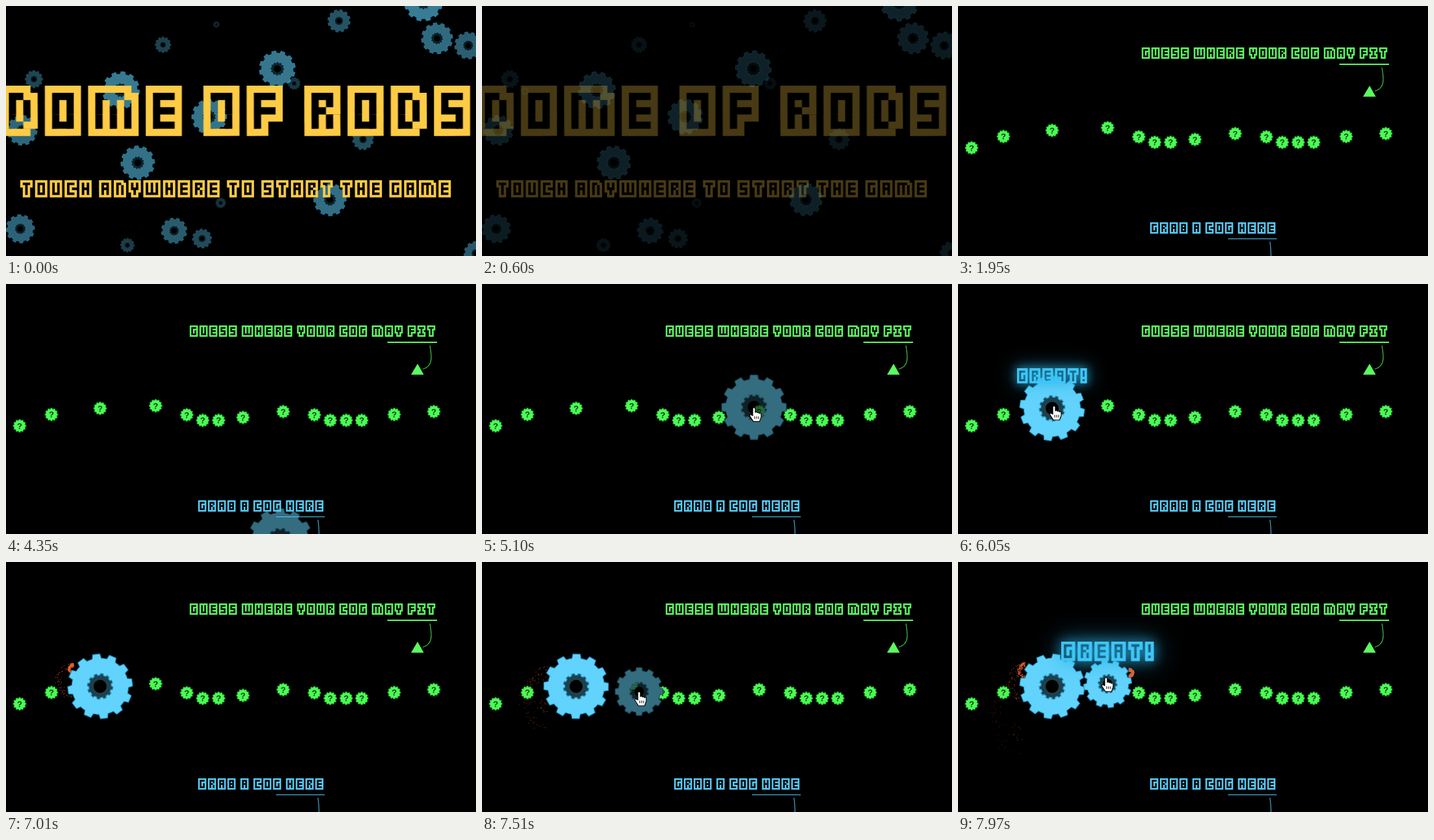
Recreate the animation shown at these times as an HTML page with a canvas. Size 724 by 386 pixels, loop 8 s.

```html
<!DOCTYPE html>
<html lang="en">
<head>
<meta charset="utf-8">
<title>Cog puzzle</title>
<style>
  html, body { margin: 0; width: 100%; height: 100%; overflow: hidden; background: #000; }
  canvas { display: block; width: 724px; height: 386px; }
</style>
</head>
<body>
<canvas id="stage" width="724" height="386" role="img"
  aria-label="Dome of Rods. Touch anywhere to start the game. Guess where your cog may fit. Grab a cog here. Great!"></canvas>
<script>
const ctx = document.getElementById('stage').getContext('2d');
const LOOP = 8000, TAU = Math.PI * 2, PITCH = TAU / 12;
const YELLOW = '#fecb45', GREEN = '#5bfb60', BLUE = '#55ccf7';
const LIT = '#62d3fc', LIT_EDGE = '#2596c4', DIM = '#346d80', DIM_EDGE = '#1f4a5a';

const clamp = v => Math.min(1, Math.max(0, v));
const ramp = (t, from, to) => clamp((t - from) / (to - from));
const smooth = p => p * p * (3 - 2 * p);
const rand = n => { const s = Math.sin(n * 127.1 + 11.7) * 43758.5453; return s - Math.floor(s); };

// Segment lettering on a 3 by 5 grid: each segment runs from x,y to x,y.
// A wide square pen paints the block, a narrow one hollows out the letter.
const SEGMENTS = {
  a: '0020', b: '2022', c: '2224', d: '0424', e: '0204', f: '0002', g: '0222', m: '1014',
  h: '0010', k: '0212', l: '2324', o: '0404', p: '2123', q: '0414', r: '2124', s: '1214', u: '2021',
  v: '0030', w: '4144', x: '0444', y: '4044'
};
const GLYPHS = {
  A: 'abcefg', B: 'abcdefg', C: 'adef', D: 'hefpq', E: 'adefg', F: 'aefg', G: 'acdef',
  H: 'bcefg', I: 'amd', M: 'vefbcw', N: 'hefr', O: 'abcdef', R: 'aefukl', S: 'acdfg',
  T: 'am', U: 'bcdef', W: 'efbcxy', Y: 'bfgs', '!': 'fo'
};
const glyphWidth = c => c === ' ' ? 1 : 'MW'.includes(c) ? 7 : c === '!' ? 3 : 5;

function lettering(text, unit, color) {
  const cv = document.createElement('canvas');
  const units = [...text].reduce((w, c) => w + glyphWidth(c) + 1, -1);
  cv.width = Math.ceil(units * unit) + 1;
  cv.height = Math.ceil(7 * unit) + 1;
  const g = cv.getContext('2d');
  g.scale(unit, unit);
  g.strokeStyle = color;
  g.lineCap = 'square';
  for (const [mode, width] of [['source-over', 3], ['destination-out', 1]]) {
    g.globalCompositeOperation = mode;
    g.lineWidth = width;
    g.beginPath();
    let left = 1.5;
    for (const c of text) {
      for (const s of GLYPHS[c] || '') {
        const [x0, y0, x1, y1] = [...SEGMENTS[s]].map(Number);
        g.moveTo(left + x0, 1.5 + y0);
        g.lineTo(left + x1 + .01, 1.5 + y1);
      }
      left += glyphWidth(c) + 1;
    }
    g.stroke();
  }
  return cv;
}

const title = lettering('DOME OF RODS', 11.1, YELLOW);
const prompt = lettering('TOUCH ANYWHERE TO START THE GAME', 3.79, YELLOW);
const guess = lettering('GUESS WHERE YOUR COG MAY FIT', 2.505, GREEN);
const grab = lettering('GRAB A COG HERE', 2.505, BLUE);
const great = lettering('GREAT!', 4.33, '#3fc6f6');

function cogPath(r, turn = 0) {
  const path = new Path2D(), root = r * .87;
  const at = (rad, a) => path.lineTo(rad * Math.cos(a), rad * Math.sin(a));
  for (let i = 0; i < 12; i++) {
    const a = turn + i * PITCH;
    path.arc(0, 0, root, a - PITCH + .16, a - .16);
    at(r, a - .11);
    at(r, a + .11);
    at(root, a + .16);
  }
  path.closePath();
  return path;
}

function drawCog(x, y, r, turn, color, edge, alpha = 1) {
  const hub = cogPath(r * .4, PITCH / 2), body = cogPath(r), ring = new Path2D(hub);
  body.addPath(hub);
  ring.arc(0, 0, r * .2, 0, TAU);
  ctx.save();
  ctx.translate(x, y);
  ctx.rotate(turn);
  ctx.globalAlpha = alpha * .6;
  ctx.fillStyle = '#000';
  ctx.fill(hub);
  ctx.globalAlpha = alpha;
  ctx.fillStyle = color;
  ctx.fill(body, 'evenodd');
  ctx.strokeStyle = edge;
  ctx.lineWidth = Math.min(1.2, r / 24);
  ctx.stroke(body);
  ctx.globalAlpha = alpha * .3;
  ctx.fill(ring, 'evenodd');
  ctx.restore();
}

// Title screen: the nearest cogs have set places, the far ones are scattered
const NEAR = [
  [643, -6], [177, 130], [418, 97], [313, 171], [203, 242], [499, 299], [664, 50], [25, 192],
  [22, 344], [712, 61], [259, 347], [724, 382], [513, 23], [550, 206], [302, 359], [43, 113]
];
const floaters = Array.from({ length: 22 }, (_, i) => {
  const [x, y] = NEAR[i] || [rand(i) * 724, rand(i + 40) * 386];
  return { x, y, r: 29.5 - .75 * i - .02 * i * i, turn: rand(i) * TAU, dir: i % 2 ? 1 : -1 };
});

function drawTitle(t) {
  const alpha = 1 - ramp(t, 30, 820);
  for (const { x, y, r, turn, dir } of floaters) {
    drawCog(x, y, r, turn + dir * t * .0004, LIT, LIT_EDGE, alpha * (.1 + r * .0165));
  }
  ctx.globalAlpha = alpha;
  ctx.drawImage(title, -6.7, 123);
  ctx.globalAlpha = Math.max(alpha, .08 * (1 - ramp(t, 1220, 1520)));
  ctx.drawImage(prompt, 22, 269);
  ctx.globalAlpha = 1;
}

// Puzzle screen: wherever a large cog meets a run of small ones, the run repeats
const runFrom = x => [[x + 48, 202], [x + 72.5, 210.5], [x + 97, 210.5]];
const SLOTS = [
  [145, 192], [230.5, 188], [21, 219], [70, 201.5], [365, 206], [427, 197],
  [548, 210.5], [598, 201.5], [659, 197], ...runFrom(230.5), ...runFrom(427)
];

// The hand carries each cog until it snaps into its slot
const COGS = [{ grab: 4340, snap: 5890, r: 50, dir: 1 }, { grab: 7040, snap: 7650, r: 37, dir: -1 }];
const HAND_START = [422.5, 399];
const MOVES = [
  [4300, 5120, 419, 190], [5180, 5680, 216, 201], [5830, 5890, 148, 188], [6330, 6720, 262, 400],
  [6720, 7040, 285, 426], [7040, 7470, 242, 200], [7560, 7650, 228, 178]
];

function handAt(t) {
  return MOVES.reduce(([x, y], [from, to, nx, ny]) => {
    const p = smooth(ramp(t, from, to));
    return [x + (nx - x) * p, y + (ny - y) * p];
  }, HAND_START);
}

function line(color, width, draw) {
  ctx.strokeStyle = color;
  ctx.lineWidth = width;
  ctx.beginPath();
  draw();
  ctx.stroke();
}

function drawSlot(x, y) {
  const shape = cogPath(10);
  ctx.save();
  ctx.translate(x, y);
  ctx.fillStyle = '#4df957';
  ctx.strokeStyle = '#169b20';
  ctx.lineWidth = 1;
  ctx.fill(shape);
  ctx.stroke(shape);
  ctx.fillStyle = '#0a420e';
  ctx.font = 'bold 13px "Liberation Sans", sans-serif';
  ctx.textAlign = 'center';
  ctx.fillText('?', 0, 4.5);
  ctx.restore();
}

function drawHints() {
  ctx.drawImage(guess, 283, 64);
  line(GREEN, 2, () => { ctx.moveTo(587.5, 90); ctx.lineTo(664, 90); });
  line('#3fb846', 1.3, () => { ctx.moveTo(653, 95); ctx.bezierCurveTo(657, 117, 656, 127, 642, 131.5); });
  ctx.fillStyle = GREEN;
  ctx.beginPath();
  ctx.moveTo(634, 123);
  ctx.lineTo(643.5, 140);
  ctx.lineTo(624, 140);
  ctx.fill();
  ctx.drawImage(grab, 296, 334);
  line(BLUE, 1, () => { ctx.moveTo(416, 359.5); ctx.lineTo(491, 359.5); });
  line('#46a8cc', 1.2, () => { ctx.moveTo(480.5, 364); ctx.quadraticCurveTo(482.5, 376, 482, 387); });
}

// Sparks fan out to one side while the whole fan sinks
function drawSparks(x, y, side, age, seed) {
  if (age < 0 || age > 1700) return;
  const reach = 60 * Math.pow(age / 1290, .55), size = 1.2 + 3 * Math.exp(-age / 50);
  ctx.fillStyle = '#e0602a';
  for (let i = 0; i < 60; i++) {
    const a = (rand(seed + i) - .5) * Math.PI;
    const d = reach * (.45 + .55 * Math.sqrt(rand(seed + i + 60)));
    ctx.globalAlpha = (1 - age / 1700) * (.45 + .55 * rand(seed + i + 120));
    ctx.fillRect(x + side * d * Math.cos(a) - size / 2,
      y + age * .064 + d * Math.sin(a) - size / 2, size, size);
  }
  ctx.globalAlpha = 1;
}

function drawGreat(x, y, age) {
  if (age <= 0 || age >= 730) return;
  const p = clamp(age / 320), s = p * (2 - p);
  ctx.save();
  ctx.globalAlpha = 1 - ramp(age, 480, 730);
  ctx.translate(x, y);
  ctx.scale(s, s);
  ctx.shadowColor = '#2bb4ea';
  for (const blur of [38, 18]) {
    ctx.shadowBlur = blur * s;
    ctx.drawImage(great, -great.width / 2, -great.height / 2);
  }
  ctx.restore();
}

function drawHand(x, y) {
  ctx.save();
  ctx.translate(x, y);
  ctx.beginPath();
  ctx.moveTo(-2, 13);
  ctx.lineTo(-2, 2);
  ctx.quadraticCurveTo(0, -1.5, 2, 2);
  ctx.lineTo(2, 8);
  for (let k = 0; k < 3; k++) ctx.quadraticCurveTo(3.8 + k * 3, 5.5 + k, 5 + k * 3, 8.5 + k);
  ctx.lineTo(11, 15);
  ctx.lineTo(8.5, 22);
  ctx.lineTo(-1, 22);
  ctx.lineTo(-6.5, 13.5);
  ctx.quadraticCurveTo(-6.5, 9.5, -2, 13);
  ctx.closePath();
  ctx.fillStyle = '#fff';
  ctx.lineJoin = 'round';
  ctx.strokeStyle = '#000';
  ctx.lineWidth = 1.2;
  ctx.fill();
  ctx.stroke();
  for (let x = 1; x < 8; x += 3) line('#000', 1, () => { ctx.moveTo(x, 14); ctx.lineTo(x, 18); });
  ctx.restore();
}

function drawPuzzle(t) {
  const hand = handAt(t);
  SLOTS.forEach(([x, y], i) => {
    if (!COGS[i] || t < COGS[i].snap) drawSlot(x, y);
  });
  for (const start of [6680, 6980, 7600, 7900]) drawSparks(104, 163, -1, t - start, start);
  drawSparks(264, 170, 1, t - 7950, 200);
  COGS.forEach(({ grab, snap, r, dir }, i) => {
    if (t < grab) return;
    const lit = t >= snap;
    const [x, y] = lit ? SLOTS[i] : hand;
    const turn = lit ? dir * (.14 + (t - 6050) * .000272) : 0;
    drawCog(x, y, r, turn, lit ? LIT : DIM, lit ? LIT_EDGE : DIM_EDGE);
  });
  drawHints();
  COGS.forEach(({ snap }, i) => drawGreat(SLOTS[i][0], SLOTS[i][1] - 49.5, t - snap));
  if (t >= COGS[0].grab) drawHand(...hand);
}

function frame(now) {
  const t = now % LOOP;
  ctx.fillStyle = '#000';
  ctx.fillRect(0, 0, 724, 386);
  if (t < 1950) drawTitle(t);
  else drawPuzzle(t);
  requestAnimationFrame(frame);
}
requestAnimationFrame(frame);
</script>
</body>
</html>
```
